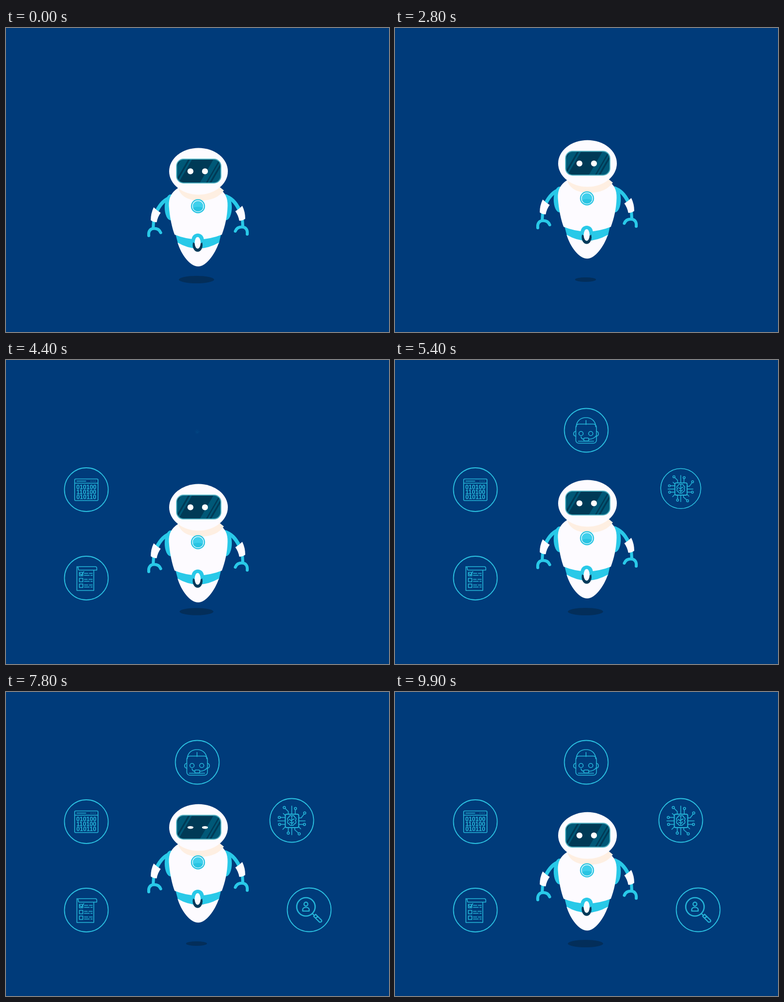
Animation, 770 px wide and 612 px high, one loop 10 s. Source, as an HTML page:

```html
<!DOCTYPE html>
<html lang="en">
<head>
<meta charset="utf-8">
<title>Floating robot</title>
<style>
html, body { margin: 0; width: 100%; height: 100%; overflow: hidden; background: #003b7a; }
svg { display: block; width: 770px; height: 612px; }
.line { fill: none; stroke: #29c9e8; stroke-linecap: round; }
.icon { fill: none; stroke: #25b4d8; stroke-width: 1.6; stroke-linecap: round; stroke-linejoin: round; }
.icon .ring { stroke: #2bc0e0; stroke-width: 1.8; }
.icon text { font: bold 12.2px "Liberation Sans", Arial, sans-serif; fill: #25b4d8; stroke: none; text-anchor: middle; }
</style>
</head>
<body>
<svg viewBox="0 0 770 612">
  <defs>
    <clipPath id="glass"><rect x="344" y="265" width="87" height="46" rx="13"/></clipPath>
    <g id="arm">
      <path class="line" stroke-width="7.5" d="M332 341Q314 346 303 369"/>
      <path class="line" stroke-width="6" d="M297 386L296 401M287 418C286 408 291 403.500 298 403.500C305 403.500 309 407 311 412"/>
      <path fill="#fdfbff" d="M297 361Q303 367 311 372Q305 380 303 391Q296 391 291 387Q291 373 297 361Z"/>
    </g>
  </defs>

  <ellipse id="shadow" rx="35.5" ry="7.5" fill="#032e5a"/>

  <g id="robot">
    <g fill="#29c9e8">
      <ellipse cx="331" cy="361" rx="12" ry="26"/>
      <ellipse cx="442" cy="361" rx="12" ry="26"/>
    </g>
    <use href="#arm"/>
    <use href="#arm" transform="translate(772 -3) scale(-1 1)"/>
    <path fill="#29c9e8" d="M340 412L346 435Q386 454 428 434L433 412Z"/>
    <path fill="#fdfbff" d="M345 432Q386 456 428 432C420 456 402 480 386.500 480C370 480 352 456 345 432Z"/>
    <path fill="#fdfbff" d="M346 322C332 331 327 342 327.500 358C329 381 334 403 339 416Q386 435 434 416C440 400 445 380 445.500 358C446 342 441 331 427 322Z"/>
    <path fill="#feefe2" d="M347 325C353 341 370 347.500 390 347.500C412 347.500 428 341 438 327L427 318H348Z"/>
    <ellipse cx="387" cy="288.500" rx="59" ry="47" fill="#fdfbff"/>

    <rect x="343" y="264" width="89" height="48" rx="14" fill="#003a56"/>
    <g clip-path="url(#glass)" fill="#005877">
      <path d="M353 263H367L338 313H324ZM371 263H375L346 313H342Z"/>
      <path d="M418 263H430L401 313H389ZM433 263H437L408 313H404ZM441 263H455L426 313H412Z"/>
    </g>
    <rect x="343" y="264" width="89" height="48" rx="14" fill="none" stroke="#4eafc0" stroke-width="2"/>
    <g fill="#fff">
      <ellipse class="eye" cx="370.800" cy="288.500" rx="6" ry="6"/>
      <ellipse class="eye" cx="400" cy="288.500" rx="6" ry="6"/>
    </g>

    <circle cx="386" cy="358.700" r="14.200" fill="#29c4e2"/>
    <circle cx="386" cy="358.700" r="11.200" fill="#3fd0ec" stroke="#e4f9ff" stroke-width="1.4"/>
    <path fill="#29c4e2" d="M376 362A10.500 10.500 0 0 0 396 362Q386 358 376 362Z"/>
    <path fill="#29c9e8" d="M373 428C373 409 398 409 398 428Z"/>
    <ellipse cx="385.300" cy="437" rx="10" ry="13.500" fill="#063a5a"/>
    <path fill="#29c9e8" d="M374 430C376 416 395 416 397 430L391 434H380Z"/>
    <ellipse cx="385.300" cy="432.500" rx="6" ry="11.800" fill="#fdfbff"/>
  </g>

  <g class="icon" data-at="161.5 439" data-start="3020">
    <circle class="ring" r="44"/>
    <path d="M-16-23H18Q21-23 21-20V-16H-14Q-16-16-16-18Q-16-23-19-23V25H15V-16"/>
    <path d="M-14-11.500h7v7h-7zM-14 .5h7v7h-7zM-14 12h7v7h-7zM-13-9l3 3 5-7"/>
    <path d="M-4-9.500h7m3 0h6M-4-5.500h10m3 0h3M-4 2.500h6m3 0h7M-4 6.500h10m3 0h3M-4 14h7m3 0h6M-4 18h10m3 0h3"/>
  </g>
  <g class="icon" data-at="161.5 261" data-start="3650">
    <circle class="ring" r="44"/>
    <rect x="-23.500" y="-21.500" width="47" height="43.500" rx="2"/>
    <path d="M-23-13H23M-19-17.200H-1M9.500-17.200h.1M13.500-17.200h.1M17.500-17.200h.1"/>
    <text y="-.8">010100</text>
    <text y="9.200">110100</text>
    <text y="19">010110</text>
  </g>
  <g class="icon" data-at="384.5 141.5" data-start="4283">
    <circle class="ring" r="44"/>
    <path d="M-20-7C-20-18-12-25.500-.5-25.500S19-18 19-7M-.5-20V-11.500"/>
    <rect x="-21" y="-12.500" width="41.500" height="38.500" rx="6"/>
    <path d="M-21 2Q-25.500 3-25.500 7T-21 12M20.500 2Q24.500 3 24.500 7T20.500 12M-16 22H15M-10.500 13Q-9.500 18-5 18M5 18Q15 18 20 11"/>
    <circle cx="-10.500" cy="6.500" r="4.300"/><circle cx="9" cy="6.500" r="4.300"/>
    <rect x="-5" y="15.500" width="10" height="6" rx="2"/>
  </g>
  <g class="icon" data-at="574.5 258.5" data-start="4913">
    <circle class="ring" r="44"/>
    <rect x="-13" y="-12.500" width="27" height="27" rx="3" stroke-width="2"/>
    <path d="M0-9C-4-11-6-8-6-6C-10-5-9-1-7 0C-10 3-8 7-5 7C-4 11 0 11 0 9ZM0-9C4-11 6-8 6-6C10-5 9-1 7 0C10 3 8 7 5 7C4 11 0 11 0 9M-5-2L0 1M5-3L1-1M-4 4L-1 5M4 3L1 6"/>
    <path d="M-13-6H-23M-13 1H-28M-13 8H-22M14-5H19L25-13M14 1H27M14 8H23M-7-13V-18L-13-24M0-13V-29M7-13V-21M-7 15V23M0 15V29M6 15V19L13 25M-13-10L-17-14M14 13L18 17M-13 13L-18 18"/>
    <circle cx="-15" cy="-26" r="2.300"/><circle cx="7.500" cy="-24" r="2.300"/>
    <circle cx="26" cy="-15" r="2.300"/><circle cx="25.500" cy="8" r="2.300"/>
    <circle cx="15" cy="27" r="2.300"/><circle cx="-7" cy="25.500" r="2.300"/>
    <circle cx="-25" cy="-6" r="2.300"/><circle cx="-24.500" cy="8" r="2.300"/>
  </g>
  <g class="icon" data-at="609.5 438.5" data-start="5543">
    <circle class="ring" r="44"/>
    <circle cx="-6.500" cy="-6" r="18.500" stroke-width="2.600"/>
    <circle cx="-6.500" cy="-11.500" r="3.800" stroke-width="2.200"/>
    <path stroke-width="2.200" d="M-13 2.500V-1Q-12-5-6.500-5T0-1V2.500Z"/>
    <path stroke-width="2.200" d="M7 8L10 11M9 13L13 9L25 21Q26 25 21 25ZM13 17L17 13"/>
  </g>
</svg>
<script>
const LOOP = 10000, FLOAT = 5000, STEP = 100, GROW = 600;
const rise = [[2300, 0], [3050, -21], [4050, 11.5], [5000, 0]];
const spread = [[2300, 1], [3000, .5], [3650, 1], [4250, .95], [4900, 1]];
const blink = [[7600, 1], [7800, .45], [8000, 1]];

const robot = document.getElementById("robot");
const shadow = document.getElementById("shadow");
const eyes = document.querySelectorAll(".eye");
const icons = document.querySelectorAll(".icon");

const ease = p => (1 - Math.cos(Math.PI * Math.min(1, Math.max(0, p)))) / 2;

// Eased value of a list of [time, value] keys, held at both ends
function at(keys, t) {
  let value = keys[0][1];
  for (let i = 1; i < keys.length; i++) {
    const [t0, v0] = keys[i - 1], [t1, v1] = keys[i];
    if (t > t0) value = v0 + (v1 - v0) * ease((t - t0) / (t1 - t0));
  }
  return value;
}

function draw(t) {
  const f = t % FLOAT;
  robot.setAttribute("transform", `translate(0 ${at(rise, f)})`);
  shadow.setAttribute("transform", `translate(383 506.5) scale(${at(spread, f)})`);
  eyes.forEach(eye => eye.setAttribute("ry", 6 * at(blink, t)));
  for (const icon of icons) {
    const { at: place, start } = icon.dataset;
    const size = ease((t - start) / GROW);
    icon.setAttribute("transform", `translate(${place}) translate(0 ${3 * (1 - size)}) scale(${size})`);
    icon.setAttribute("opacity", Math.min(1, size * 3));
    icon.setAttribute("visibility", size > 0 ? "visible" : "hidden");
  }
}

const begin = performance.now();
function tick() {
  const t = (performance.now() - begin) % LOOP;
  draw(Math.floor(t / STEP) * STEP);
  requestAnimationFrame(tick);
}
tick();
</script>
</body>
</html>
```
